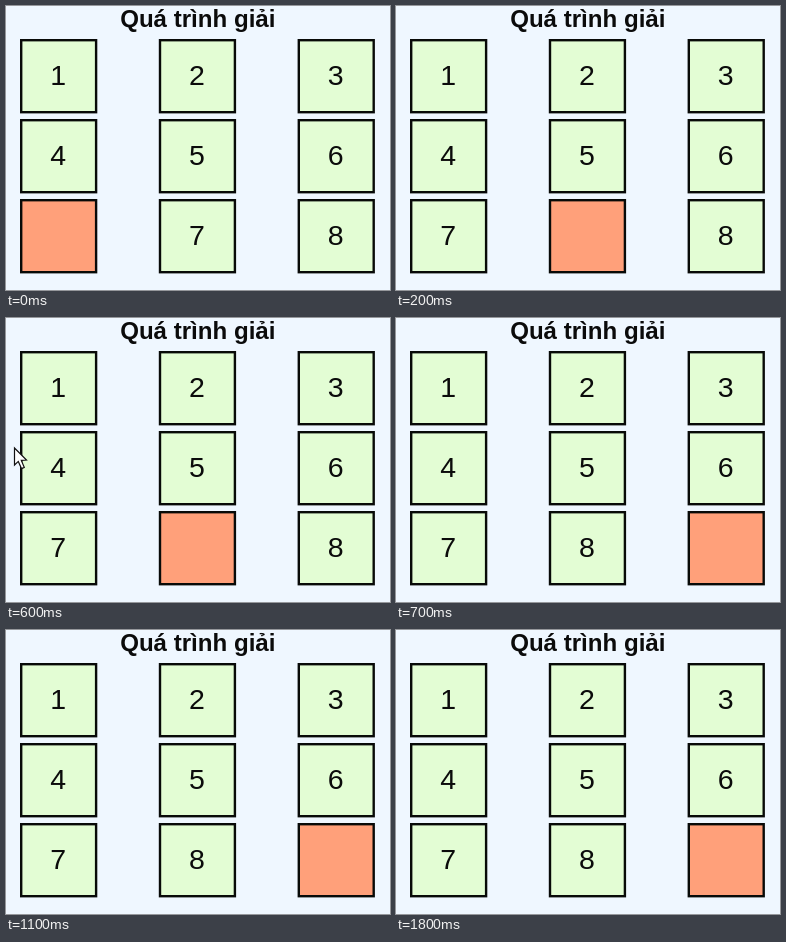
Write an HTML page with a canvas that moves like this. It is 384 px wide and 284 px high and loops after 2.1 s.

```html
<!DOCTYPE html>
<html lang="vi">
<head>
<meta charset="utf-8">
<style>
html, body { margin: 0; width: 100%; height: 100%; overflow: hidden; background: #eff7ff; }
canvas { display: block; }
</style>
</head>
<body>
<canvas id="stage" width="384" height="284"></canvas>
<script>
const ctx = document.getElementById('stage').getContext('2d');
const LOOP = 2100;
const FONT = '"Liberation Sans", Arial, sans-serif';

// Bottom row of the puzzle over time; 0 is the empty cell.
const steps = [
  { at: 0, row: [0, 7, 8] },
  { at: 200, row: [7, 0, 8] },
  { at: 700, row: [7, 8, 0] }
];

function text(str, x, y, font) {
  ctx.font = font + ' ' + FONT;
  ctx.fillStyle = '#0b0b0b';
  ctx.fillText(str, x, y);
}

function tile(value, col, row) {
  const x = 14 + col * 138.8, y = 33 + row * 80;
  ctx.fillStyle = '#080a08';
  ctx.fillRect(x, y, 77.3, 74.4);
  ctx.fillStyle = value ? '#e3fdd4' : '#ffa07a';
  ctx.fillRect(x + 2.4, y + 2.4, 72.5, 69.6);
  if (value) text(value, x + 38.2, y + 45.6, '28.5px');
}

function cursor(x, y) {
  const points = [[0, 0], [0, 17], [3.8, 13.4], [7, 20.6], [9.8, 19.4], [6.8, 12.4], [12, 12]];
  ctx.beginPath();
  for (const [dx, dy] of points) ctx.lineTo(x + dx, y + dy);
  ctx.closePath();
  ctx.fillStyle = '#fff';
  ctx.fill();
  ctx.strokeStyle = '#111';
  ctx.lineWidth = 1.2;
  ctx.stroke();
}

function draw(now) {
  const t = now % LOOP;
  const row = steps.filter(s => s.at <= t).pop().row;
  ctx.fillStyle = '#eff7ff';
  ctx.fillRect(0, 0, 384, 284);
  ctx.textAlign = 'center';
  text('Quá trình giải', 191.8, 21, 'bold 24.1px');
  [1, 2, 3, 4, 5, 6, ...row].forEach((v, i) => tile(v, i % 3, Math.floor(i / 3)));
  if (t >= 600 && t < 700) cursor(8.5, 130);
}

const start = performance.now();
function tick() {
  draw(performance.now() - start);
  requestAnimationFrame(tick);
}
tick();
</script>
</body>
</html>
```
